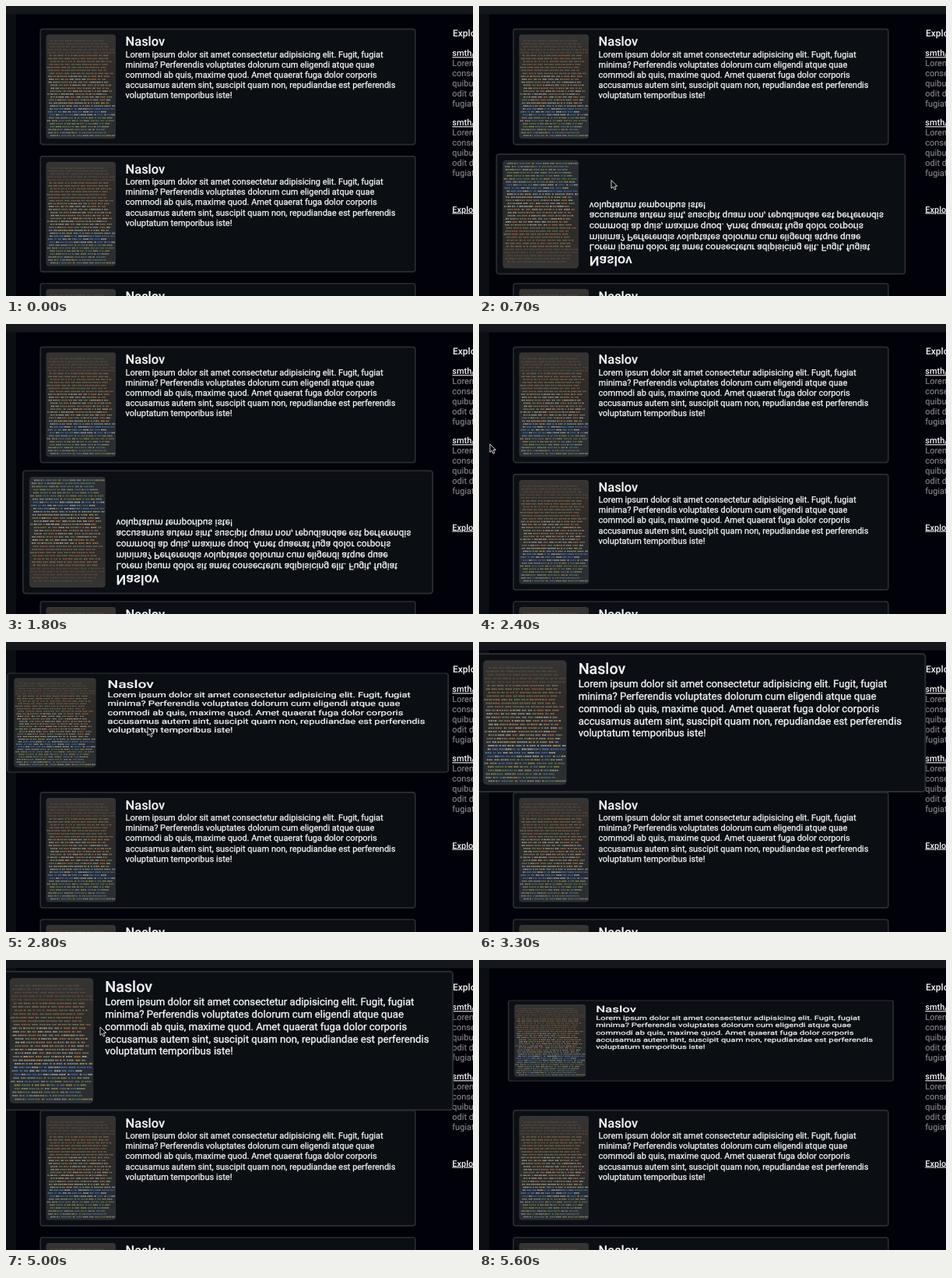
An HTML page for the animation above (5.7 s loop, 600 by 372 pixels).

```html
<!DOCTYPE html>
<html lang="en">
<head>
<meta charset="utf-8">
<title>Hover cards</title>
<style>
  html, body { margin: 0; width: 100%; height: 100%; overflow: hidden; background: #010109; }
  svg { display: block; width: 600px; height: 372px; font: 10.97px Roboto, sans-serif; fill: #f4f4f4; text-rendering: geometricPrecision; }
  .frame { fill: #0b0f13; stroke: #2a2e32; stroke-width: 1.6; }
  .title { font-size: 16.4px; font-weight: 500; stroke: #f4f4f4; stroke-width: .15; }
  .body { stroke: #f4f4f4; stroke-width: .28; }
  .head { font-size: 12px; font-weight: 500; }
  .link { text-decoration: underline; font-weight: 500; }
  .dim { fill: #858588; stroke: #858588; stroke-width: .15; }
  .code { fill: none; stroke-width: 1.5; }
</style>
</head>
<body>
<svg id="stage" viewBox="0 0 600 372">
  <defs>
    <linearGradient id="photo" x2="0" y2="1">
      <stop offset="0" stop-color="#363534"/>
      <stop offset=".25" stop-color="#302c29"/>
      <stop offset=".65" stop-color="#2a2b2e"/>
      <stop offset="1" stop-color="#2c2f33"/>
    </linearGradient>
  </defs>
  <rect width="600" height="372" fill="#010109"/>
  <rect width="13" height="372" fill="#0b0f13"/>
  <rect width="600" height="10.5" fill="#14181d"/>
  <g id="side"></g>
  <g id="cards"></g>
  <path id="cursor" d="M0 0V10.5L2.5 8.3 4.2 12.2 6 11.4 4.4 7.6H7.6Z" fill="#000" stroke="#eee" stroke-width=".9"/>
</svg>
<script>
const LOOP = 5700, STEP = 100, TURN = 650;
const $ = id => document.getElementById(id);

const text = (x, y, cls, s) => `<text x="${x}" y="${y}" class="${cls}">${s}</text>`;
const lines = (x, y, gap, cls, list) => list.map((s, i) => text(x, y + i * gap, cls, s)).join('');

let seed = 7;
const rand = () => (seed = seed * 16807 % 2147483647) / 2147483647;

// Rows of short coloured dashes that read as code on a screen
function codeDashes() {
  const bands = [
    [.2, ['#5a4437', '#4c4540', '#504c40']],
    [.4, ['#80563e', '#756656', '#626848']],
    [.64, ['#9a9484', '#647a50', '#94653f', '#85837a']],
    [.70, ['#a88f42', '#70889a', '#98948a']],
    [.78, ['#3a629a', '#4a75a8', '#8f9ba4']],
    [1, ['#8a8048', '#7d827a', '#54714b', '#506578']]
  ];
  const paths = {};
  for (let y = 8; y < 132; y += 3.8) {
    const colors = bands.find(b => y / 133.7 < b[0])[1];
    const end = 74 + rand() * 13;
    for (let x = 1 + rand() * 5; x < end;) {
      const w = Math.min(1.5 + rand() * 6, 88.5 - x);
      const c = colors[Math.floor(rand() * colors.length)];
      paths[c] = (paths[c] || '') + `M${x.toFixed(1)} ${y.toFixed(1)}h${w.toFixed(1)}`;
      x += w + .5 + rand() * 1.5;
    }
  }
  return Object.entries(paths).map(([c, d]) =>
    `<path class="code" stroke="${c}" stroke-dasharray="2 .4" d="${d}"/>`).join('');
}

const cardMarkup = `
  <rect class="frame" x="-240.8" y="-74" width="481.6" height="148" rx="3"/>
  <g transform="translate(-233.5 -67)">
    <rect width="89.5" height="133.7" rx="4" fill="url(#photo)"/>${codeDashes()}
  </g>` +
  text(-131.4, -52.3, 'title', 'Naslov') +
  lines(-131.4, -37.9, 13.17, 'body', [
    'Lorem ipsum dolor sit amet consectetur adipisicing elit. Fugit, fugiat',
    'minima? Perferendis voluptates dolorum cum eligendi atque quae',
    'commodi ab quis, maxime quod. Amet quaerat fuga dolor corporis',
    'accusamus autem sint, suscipit quam non, repudiandae est perferendis',
    'voluptatum temporibus iste!'
  ]);

$('side').innerHTML = text(574, 39, 'head', 'Explore') +
  [64.3, 153.3].map(y => text(573.3, y, 'link', 'smth/smth') +
    lines(573.3, y + 13.1, 13, 'dim', ['Lorem ipsum', 'consectetur', 'quibusdam', 'odit dolor', 'fugiat'])).join('') +
  text(573.3, 264.5, 'link', 'Explore more');

// Each hover is [enter, leave] in ms
const cards = [
  { y: 103.6, hovers: [[2415, 3285], [4200, 5225]] },
  { y: 266.9, hovers: [[525, 1597]] },
  { y: 430, hovers: [] }
];
for (const card of cards) {
  card.el = document.createElementNS('http://www.w3.org/2000/svg', 'g');
  card.el.innerHTML = cardMarkup;
  $('cards').append(card.el);
}

// Pointer visits as [time, x, y]; it is off stage between them
const visits = [
  [[470, -12, 244], [500, 29, 240], [600, 110, 230], [800, 230, 217], [1100, 290, 208], [1300, 280, 207], [1590, -12, 200]],
  [[2360, -12, 157], [2400, 14, 154], [2500, 90, 140], [2750, 190, 112], [3000, 150, 100], [3285, -12, 95]],
  [[4160, -12, 94], [4200, 59, 92], [4500, 150, 88], [5000, 121, 86], [5225, -12, 87]]
];

// cubic-bezier(.25, .1, .25, 1)
function ease(u) {
  if (u <= 0) return 0;
  if (u >= 1) return 1;
  const curve = (a, b, s) => 3 * a * s * (1 - s) ** 2 + 3 * b * s * s * (1 - s) + s ** 3;
  let lo = 0, hi = 1;
  for (let i = 0; i < 24; i++) {
    const mid = (lo + hi) / 2;
    if (curve(.25, .25, mid) < u) lo = mid; else hi = mid;
  }
  return curve(.1, 1, lo);
}

function pointer(t) {
  for (const path of visits)
    for (let i = 1; i < path.length; i++) {
      const [t0, x0, y0] = path[i - 1], [t1, x1, y1] = path[i];
      if (t >= t0 && t < t1) {
        const k = (t - t0) / (t1 - t0);
        return [x0 + (x1 - x0) * k, y0 + (y1 - y0) * k];
      }
    }
  return [-50, -50];
}

function draw(t) {
  for (const { el, y, hovers } of cards) {
    const p = hovers.reduce((sum, [enter, leave]) =>
      sum + ease((t - enter) / TURN) - ease((t - leave) / TURN), 0);
    const scale = 1 + .2 * p;
    el.setAttribute('transform',
      `translate(285 ${y}) scale(${scale} ${scale * Math.cos(2 * Math.PI * p)})`);
    if (p > .001 && el !== $('cards').lastChild) $('cards').append(el);
  }
  $('cursor').setAttribute('transform', `translate(${pointer(t)})`);
}

const start = performance.now();
function tick() {
  const t = (performance.now() - start) % LOOP;
  draw(Math.floor(t / STEP) * STEP);
  requestAnimationFrame(tick);
}
tick();
</script>
</body>
</html>
```
